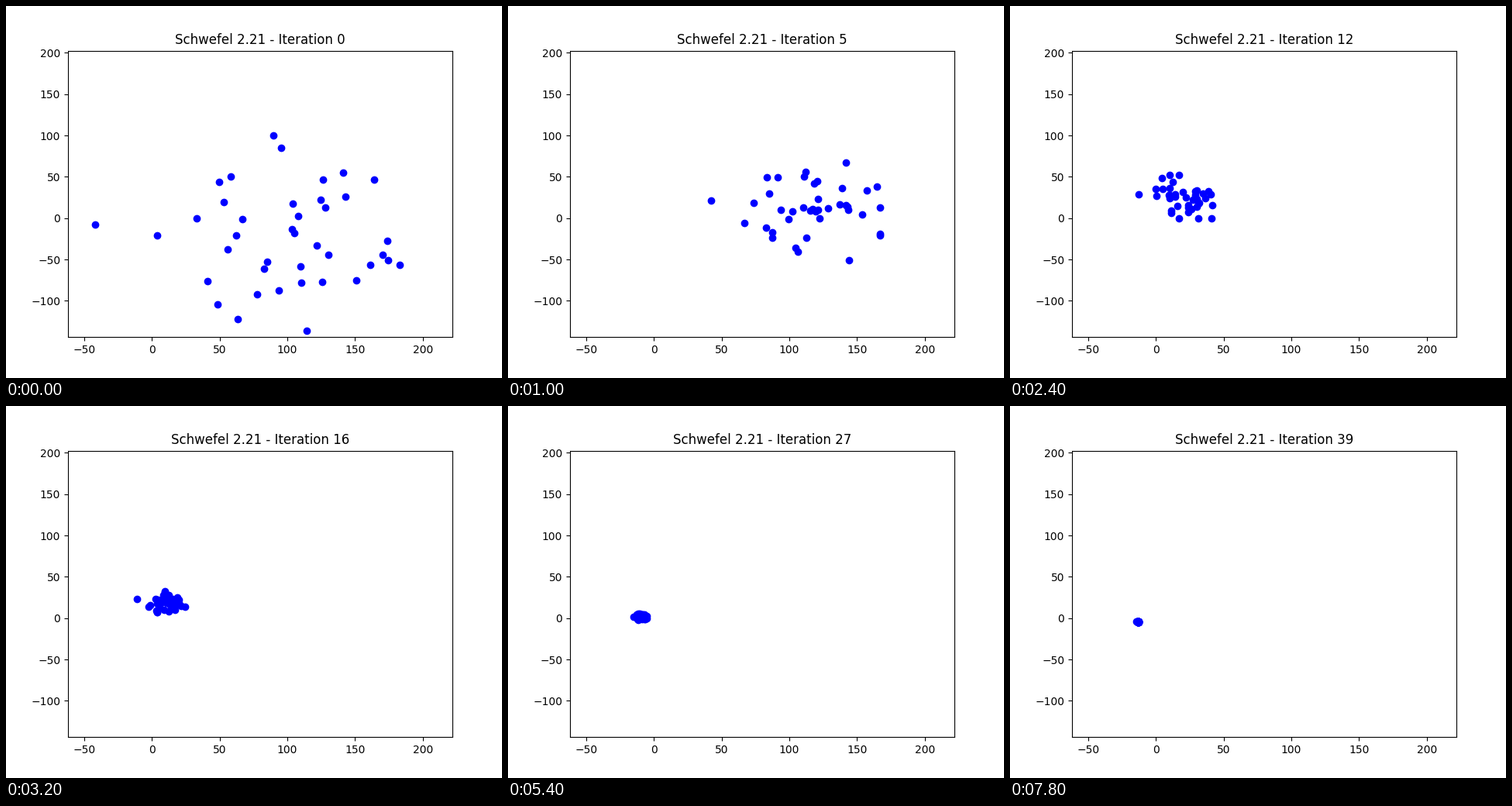
Animation of 640x480 px, one loop 8 s. Source, as a matplotlib script:

```python
import numpy as np
import matplotlib.pyplot as plt
from matplotlib.animation import FuncAnimation

W, H, DPI = 640, 480, 100
STEPS, POP = 40, 40

# Course of the swarm: centre and spread at a few iterations.
TIMES = [0, 5, 9, 12, 20, 27, 39]
CENTRE_X = [93, 117, 46, 20.5, 0, -9.3, -13.2]
CENTRE_Y = [-20, 15, 51, 26, 18, 1.5, -4.4]
SPREAD_X = [45, 25, 16, 11, 4.5, 2, 0.35]
SPREAD_Y = [60, 33, 15, 13, 4, 2, 0.35]


def course(i, values):
    return np.interp(i, TIMES, values)


def swarm(i):
    """Population of iteration i: a cloud that drifts and contracts."""
    rng = np.random.default_rng(100 + i)
    noise = np.clip(rng.normal(size=(POP, 2)), -2, 2)
    noise[0] = -3, 0.2  # one straggler trails on the left
    centre = [course(i, CENTRE_X), course(i, CENTRE_Y)]
    spread = np.exp([course(i, np.log(s)) for s in (SPREAD_X, SPREAD_Y)])
    return centre + noise * spread


fig, ax = plt.subplots(figsize=(W / DPI, H / DPI), dpi=DPI)
ax.set(xlim=(-61.94, 221.82), ylim=(-143.87, 202.63))
dots = ax.scatter([], [], s=36, c="blue")
title = ax.set_title("")


def draw(i):
    dots.set_offsets(swarm(i))
    title.set_text(f"Schwefel 2.21 - Iteration {i}")
    return dots, title


anim = FuncAnimation(fig, draw, frames=STEPS, interval=200,
                     repeat=True, repeat_delay=0)
plt.show()
```
